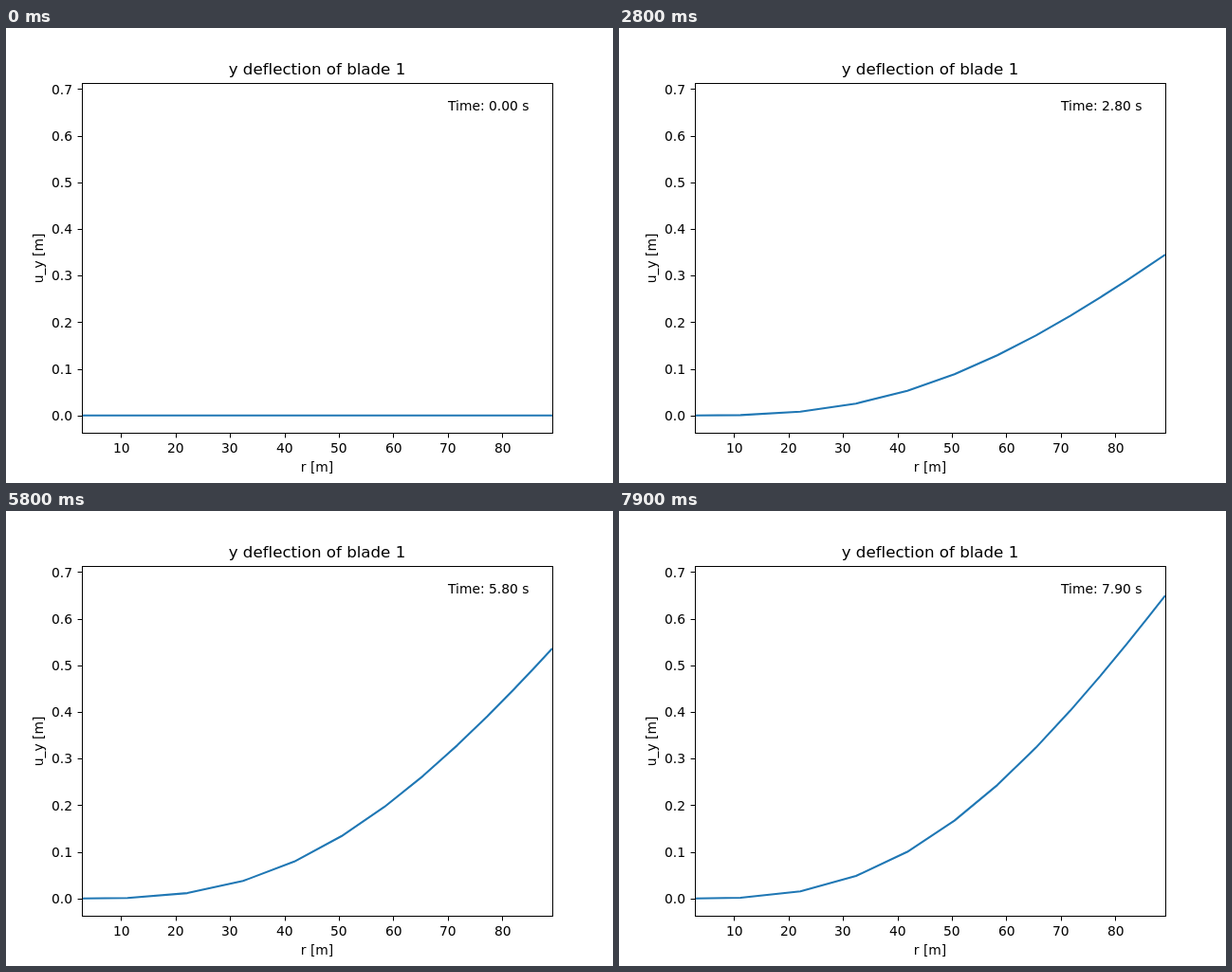
Recreate the animation shown at these times as an HTML page. Size 640 by 480 pixels, loop 8 s.

```html
<!DOCTYPE html>
<html lang="en">
<head>
<meta charset="utf-8">
<title>y deflection of blade 1</title>
<style>
html, body { margin: 0; width: 100%; height: 100%; overflow: hidden; background: #fff; }
svg { display: block; width: 640px; height: 480px; }
text { font: 13.89px "DejaVu Sans", sans-serif; font-variant-ligatures: none; fill: #000; }
.title { font-size: 16.67px; }
.mid { text-anchor: middle; }
.axis { fill: none; stroke: #000; stroke-width: 1; }
</style>
</head>
<body>
<svg viewBox="0 0 640 480">
  <defs><clipPath id="plot"><rect x="80" y="57.6" width="496" height="369.6"/></clipPath></defs>
  <polyline id="curve" clip-path="url(#plot)" fill="none" stroke="#1f77b4" stroke-width="2.08" stroke-linejoin="round"/>
  <rect class="axis" x="80.5" y="58.5" width="496" height="369"/>
  <g id="ticks"></g>
  <text class="title mid" x="328" y="49">y deflection of blade 1</text>
  <text class="mid" x="328" y="468">r [m]</text>
  <text class="mid" transform="translate(39 243) rotate(-90)">u_y [m]</text>
  <text id="clock" x="466" y="87"></text>
</svg>
<script>
const LOOP = 8000, STEP = 100;
const ROOT = 2.8, TIP = 89.166;
const HALF_SWING = 1.16;
// Tip deflection in metres at each turning point
const turns = [0, 0.68, 0.117, 0.739, 0.053, 0.536, 0.178, 0.694];

const px = r => 80 + (r - ROOT) * 496 / (TIP - ROOT);
const py = u => 408.75 - u * 492;
const snap = v => Math.floor(v + 0.5) + 0.5;

// Blade stations lie closer together towards the tip
const stations = Array.from({ length: 13 }, (_, k) => Math.max(ROOT, TIP - 2.8 * k - 0.39 * k * k));

function tipAt(t) {
  const i = Math.floor(t / HALF_SWING);
  const ease = (1 - Math.cos(Math.PI * (t / HALF_SWING - i))) / 2;
  return turns[i] + (turns[i + 1] - turns[i]) * ease;
}

// Main bending shape plus a small, slowly growing second mode
function deflection(r, t) {
  const s = (r - ROOT) / (TIP - ROOT);
  const second = -0.0034 * t * Math.sin(Math.PI * (t - 3.7) / 3.6);
  return tipAt(t) * s ** (2.68 - 0.68 * s) + second * s * s * (1 - s);
}

function buildTicks() {
  const tick = (line, label, x, y) =>
    `<path class="axis" d="${line}"/><text x="${Math.round(x)}" y="${Math.round(y)}">${label}</text>`;
  let out = "";
  for (let r = 10; r <= 80; r += 10) {
    out += tick(`M${snap(px(r))} 427.5v4.9`, r, px(r) - 8.84, 448);
  }
  for (let i = 0; i <= 7; i++) {
    const y = py(i / 10);
    out += tick(`M80.5 ${snap(y)}h-4.9`, (i / 10).toFixed(1), 48.2, y + 5.27);
  }
  document.getElementById("ticks").innerHTML = out;
}

const curve = document.getElementById("curve");
const clock = document.getElementById("clock");

function draw(ms) {
  const t = Math.floor((ms % LOOP) / STEP) * STEP / 1000;
  const points = stations.map(r => `${px(r).toFixed(2)},${py(deflection(r, t)).toFixed(2)}`);
  curve.setAttribute("points", points.join(" "));
  clock.textContent = `Time: ${t.toFixed(2)} s`;
}

buildTicks();
draw(0);
let start;
function tick(now) {
  start ??= now;
  draw(now - start);
  requestAnimationFrame(tick);
}
requestAnimationFrame(tick);
</script>
</body>
</html>
```
